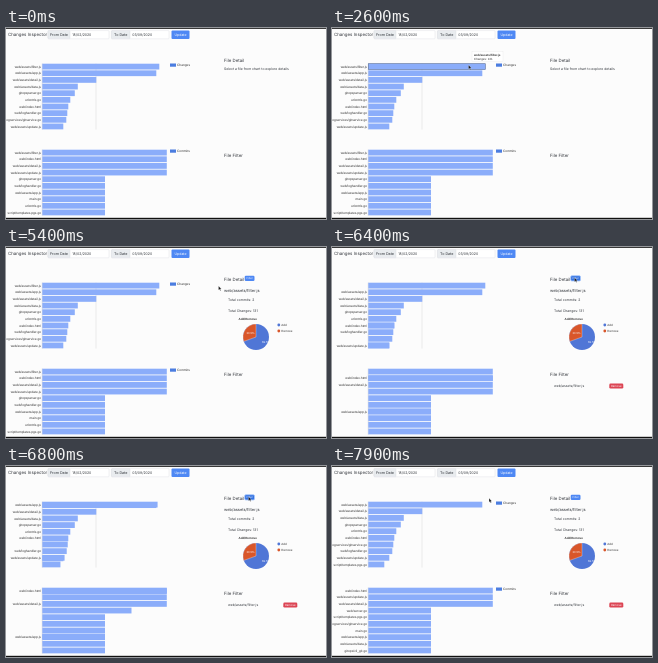
Recreate the animation shown at these times as an HTML page. Size 320 px wide and 191 px high, loop 8 s.

```html
<!DOCTYPE html>
<html lang="en">
<head>
<meta charset="utf-8">
<title>Changes Inspector</title>
<style>
  html, body { margin: 0; width: 100%; height: 100%; overflow: hidden; background: #fcfcfc; }
  svg { display: block; width: 100vw; height: 100vh; }
  text { font-family: Inter, "Open Sans", sans-serif; fill: #30343a; text-rendering: geometricPrecision; }
  .chart { font-family: "Liberation Sans", Arial, sans-serif; fill: #333; }
</style>
</head>
<body>
<svg id="stage" viewBox="0 0 320 191"></svg>
<script>
const LOOP = 8000, STEP = 100;
const REDRAW_START = 6400, REDRAW_END = 7100;
const LEFT = 36.3, PITCH = 6.65, BAR_HEIGHT = 5.8;
const BAR = '#8badfa', BLUE = '#4e88f4';
const stage = document.getElementById('stage');

function add(parent, tag, attrs, content) {
  const node = document.createElementNS('http://www.w3.org/2000/svg', tag);
  for (const key in attrs) node.setAttribute(key, attrs[key]);
  if (content) node.textContent = content;
  parent.appendChild(node);
  return node;
}
const group = () => add(stage, 'g', {});
const rect = (parent, x, y, width, height, fill, extra) =>
  add(parent, 'rect', { x, y, width, height, fill, ...extra });
const text = (parent, x, y, size, content, extra) =>
  add(parent, 'text', { x, y, 'font-size': size, ...extra }, content);
const chartText = (parent, x, y, size, content, extra) =>
  text(parent, x, y, size, content, { class: 'chart', ...extra });
const show = (node, visible) => node.setAttribute('display', visible ? 'inline' : 'none');
const clamp = v => Math.max(0, Math.min(1, v));
const lerp = (a, b, p) => a + (b - a) * p;

function buildHeader() {
  const g = group();
  const border = { stroke: '#d5d9de', 'stroke-width': 0.35, rx: 0.8 };
  const field = (x, split, end, label, value) => {
    rect(g, x, 2.6, end - x, 8.2, '#fff', border);
    rect(g, x, 2.6, split - x, 8.2, '#e9ecef', border);
    text(g, (x + split) / 2, 8.1, 3.7, label, { 'text-anchor': 'middle' });
    text(g, split + 2.2, 8.1, 3.5, value);
  };
  text(g, 2, 8.4, 4.4, 'Changes Inspector');
  field(42, 64, 103, 'From Date', '18/02/2020');
  field(105.5, 124, 163, 'To Date', '03/09/2020');
  rect(g, 165.5, 2.5, 18, 8.4, BLUE, { rx: 1 });
  text(g, 174.5, 8, 3.5, 'Update', { 'text-anchor': 'middle', style: 'fill:#fff' });
}

// Names present before and after slide to their new row; other rows change in place.
function buildChart(top, legendName, before, after, kept, hasGrid) {
  const g = group();
  const centre = row => top + PITCH * row;
  if (hasGrid) rect(g, 89.8, top - 3, 0.4, 66, '#cfcfcf');
  rect(g, LEFT - 0.4, top - 3, 0.4, 66, '#b5b5b5');

  const makeBar = ([name, width], row) => ({
    name, width, row,
    bar: rect(g, LEFT, centre(row) - BAR_HEIGHT / 2, width, BAR_HEIGHT, BAR),
    label: chartText(g, 35, centre(row) + 1.1, 3.25, name, { 'text-anchor': 'end' })
  });
  const oldBars = before.map(makeBar);
  const newBars = after.map(makeBar);
  const sliding = oldBars.filter(b => kept.includes(b.name));
  const fillers = oldBars.filter((b, i) => !kept.includes(b.name) || !kept.includes(newBars[i].name))
    .map(b => ({
      from: b.width, to: newBars[b.row].width,
      bar: rect(g, LEFT, centre(b.row) - BAR_HEIGHT / 2, b.width, BAR_HEIGHT, BAR)
    }));
  for (const b of sliding) { g.append(b.bar); g.append(b.label); }

  const legend = add(g, 'g', {});
  rect(legend, 164, top - 3.1, 6, 3.2, '#4b7de0');
  chartText(legend, 171, top - 0.3, 3.25, legendName);

  return time => {
    const u = clamp((time - REDRAW_START) / (REDRAW_END - REDRAW_START));
    const eased = 1 - (1 - u) ** 3;
    const redrawing = time >= REDRAW_START && time < REDRAW_END;
    const done = time >= REDRAW_END;
    show(legend, !redrawing);
    for (const b of oldBars) {
      const slides = sliding.includes(b);
      const visible = !done && (!redrawing || slides);
      show(b.bar, visible);
      show(b.label, visible);
      if (slides) {
        const target = newBars.find(n => n.name === b.name);
        const y = lerp(centre(b.row), centre(target.row), eased);
        b.bar.setAttribute('y', y - BAR_HEIGHT / 2);
        b.bar.setAttribute('width', lerp(b.width, target.width, u));
        b.label.setAttribute('y', y + 1.1);
      }
    }
    for (const b of newBars) { show(b.bar, done); show(b.label, done); }
    for (const f of fillers) {
      show(f.bar, redrawing);
      f.bar.setAttribute('width', lerp(f.from, f.to, u));
    }
  };
}

function buildDetail() {
  const g = group();
  text(g, 218, 34.4, 4.4, 'File Detail');
  text(g, 218, 128.8, 4.4, 'File Filter');
  const hint = text(g, 218, 42, 3.4, 'Select a file from chart to explore details');

  const info = add(g, 'g', {});
  const button = rect(info, 238.7, 28.7, 9.8, 5.3, BLUE, { rx: 1.2 });
  text(info, 243.6, 32.3, 2.6, 'Filter', { 'text-anchor': 'middle', style: 'fill:#fff' });
  text(info, 218, 44.6, 4, 'web/assets/filter.js');
  text(info, 222, 54, 3.4, 'Total commits: 2');
  text(info, 222, 65, 3.4, 'Total Changes: 131');
  chartText(info, 232.5, 73.3, 3, 'Add/Remove', { 'font-weight': 'bold' });

  const cx = 250, cy = 90, r = 13, angle = 2 * Math.PI * 0.695;
  add(info, 'circle', { cx, cy, r, fill: '#5076d6' });
  add(info, 'path', {
    d: `M${cx} ${cy}L${cx + r * Math.sin(angle)} ${cy - r * Math.cos(angle)}A${r} ${r} 0 0 1 ${cx} ${cy - r}Z`,
    fill: '#d9562a', stroke: '#fff', 'stroke-width': 0.3
  });
  const share = (x, y, value) =>
    chartText(info, x, y, 2.8, value, { 'text-anchor': 'middle', style: 'fill:#fff' });
  share(244.5, 87, '30.5%');
  share(260, 96, '69.5%');
  [['Add', '#5076d6'], ['Remove', '#d9562a']].forEach(([name, fill], i) => {
    add(info, 'circle', { cx: 272.8, cy: 78 + 6 * i, r: 1.4, fill });
    chartText(info, 275.3, 79 + 6 * i, 3, name);
  });

  const filter = add(g, 'g', {});
  text(filter, 222, 140.3, 3.4, 'web/assets/filter.js');
  rect(filter, 277.3, 136.6, 14, 5, '#dc4554', { rx: 1.3 });
  text(filter, 284.3, 140.1, 2.8, 'Remove', { 'text-anchor': 'middle', style: 'fill:#fff' });

  return time => {
    show(hint, time < 2700);
    show(info, time >= 2700);
    show(filter, time >= REDRAW_START);
    const hovered = time >= 6100 && time < 7700;
    button.setAttribute('fill', hovered ? '#3674e2' : BLUE);
    button.setAttribute('stroke', hovered ? '#a9c8fb' : 'none');
    button.setAttribute('stroke-width', 0.8);
  };
}

function buildTooltip() {
  const g = group();
  rect(g, LEFT, 35.7, 117, 5.7, 'none', { stroke: '#596e98', 'stroke-width': 0.6 });
  rect(g, 140, 23.8, 31, 9.4, '#fff', { stroke: '#ddd', 'stroke-width': 0.25 });
  chartText(g, 142, 27.5, 3, 'web/assets/filter.js', { 'font-weight': 'bold' });
  chartText(g, 142, 31.6, 3, 'Changes: 131');
  return time => show(g, time >= 2600 && time < 3600);
}

function buildCursor() {
  const arrow = add(stage, 'path', {
    d: 'M0 0V4L1 3.2L1.7 4.7L2.4 4.4L1.7 3H2.9Z', fill: '#111', stroke: '#fff', 'stroke-width': 0.25
  });
  const path = [
    [700, 170, 169], [1500, 136, 37.5], [1700, 136, 37.5], [1800, 135.6, 37],
    [2200, 135.6, 37], [2300, 136.5, 37], [3500, 136.5, 37], [4100, 206, 40],
    [5300, 206, 40], [5400, 212.5, 39], [5900, 241, 32.5], [6100, 241, 32.5],
    [6200, 242.5, 30.7], [7600, 242.5, 30.7], [7900, 157, 32.3], [LOOP, 157, 32.3]
  ];
  return time => {
    show(arrow, time >= path[0][0]);
    const next = Math.max(1, path.findIndex(point => point[0] > time));
    const [t0, x0, y0] = path[next - 1], [t1, x1, y1] = path[next];
    const p = clamp((time - t0) / (t1 - t0));
    arrow.setAttribute('transform', `translate(${lerp(x0, x1, p)} ${lerp(y0, y1, p)})`);
  };
}

const file = {
  filter: 'web/assets/filter.js', app: 'web/assets/app.js', detail: 'web/assets/detail.js',
  data: 'web/assets/data.js', update: 'web/assets/update.js', parser: 'gitopsparser.go',
  url: 'urlcntrls.go', index: 'web/index.html', handler: 'web/loghandler.go',
  log: 'logservices/gitservice.go', script: 'script/templates.pgs.go',
  server: 'web/server.go', main: 'main.go', cli: 'gitops/cli_git.go'
};
const entries = (names, widths) => names.split(' ').map((name, i) => [file[name], widths(i)]);
const names = list => list.split(' ').map(name => file[name]);
const changes = [117, 114, 54, 35.5, 32.5, 28, 26, 25, 24, 21, 16];
const commits = full => i => i < full ? 124.5 : 62.7;

buildHeader();
const updates = [
  buildChart(38.6, 'Changes',
    entries('filter app detail data parser url index handler log update', i => changes[i]),
    entries('app detail data parser url index log handler update script', i => changes[i + 1]),
    names('app detail data parser url index handler update'), true),
  buildChart(124.6, 'Commits',
    entries('filter index detail update parser handler app main url script', commits(4)),
    entries('index update detail server script log main app data cli', commits(3)),
    names('index detail app'), false),
  buildDetail(),
  buildTooltip(),
  buildCursor()
];
rect(stage, 0, 0, 320, 0.9, '#222');
rect(stage, 0, 189.8, 320, 1.2, '#111');

function draw(now) {
  const time = Math.floor(now % LOOP / STEP) * STEP;
  for (const update of updates) update(time);
}
function frame() {
  draw(performance.now() - start);
  requestAnimationFrame(frame);
}
const start = performance.now();
frame();
</script>
</body>
</html>
```
